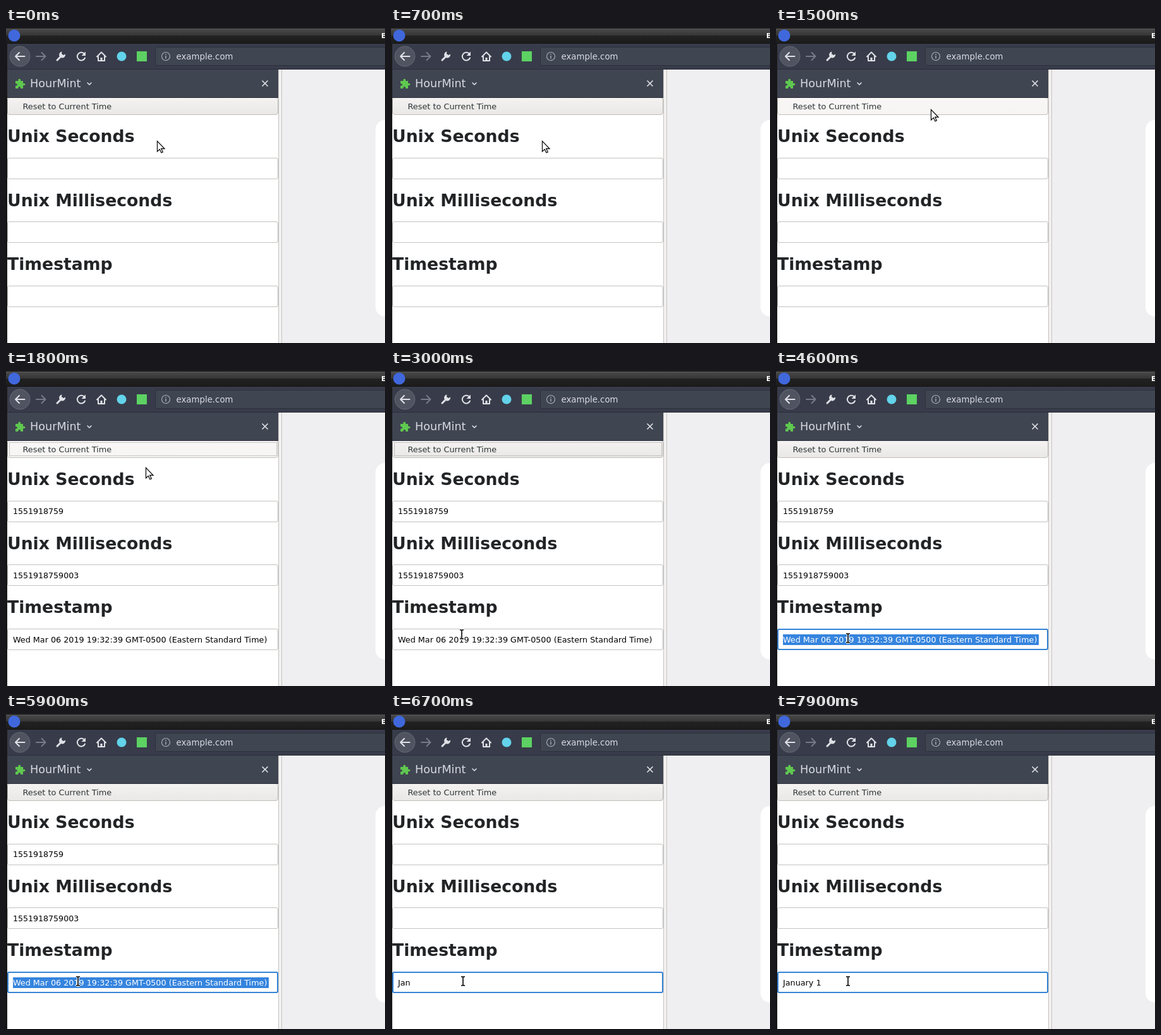
Recreate the animation shown at these times as an HTML page. Size 600x500 px, loop 8 s.

```html
<!DOCTYPE html>
<html lang="en">
<head>
<meta charset="utf-8">
<title>Time sidebar</title>
<style>
  html, body { margin: 0; width: 100%; height: 100%; overflow: hidden; background: #fff; }
  svg { display: block; width: 600px; height: 500px; }
  text { font-family: "DejaVu Sans", sans-serif; white-space: pre; }
  .head { font-size: 26.67px; font-weight: bold; fill: #222426; }
  .value { font-size: 12.75px; fill: #000; }
  .number { font-size: 12.6px; }
  .field { fill: #fff; stroke: #c2c2c0; }
  .icon { fill: none; stroke: #dfe1e6; stroke-width: 2; stroke-linecap: round; stroke-linejoin: round; }
</style>
</head>
<body>
<svg viewBox="0 0 600 500">
  <defs>
    <linearGradient id="bar" x2="0" y2="1">
      <stop offset="0" stop-color="#4c4c4c"/>
      <stop offset=".46" stop-color="#363636"/>
      <stop offset=".47" stop-color="#222"/>
      <stop offset="1" stop-color="#1b1b1b"/>
    </linearGradient>
    <linearGradient id="plain" x2="0" y2="1">
      <stop offset="0" stop-color="#f4f3f2"/>
      <stop offset="1" stop-color="#e9e8e6"/>
    </linearGradient>
    <linearGradient id="lit" x2="0" y2="1">
      <stop offset="0" stop-color="#f8f7f6"/>
      <stop offset="1" stop-color="#f6f5f3"/>
    </linearGradient>
  </defs>

  <!-- window frame and toolbar -->
  <rect width="600" height="500" fill="#fff"/>
  <rect width="600" height="25" fill="url(#bar)"/>
  <rect width="600" height="1" fill="#171717"/>
  <rect y="1" width="600" height="1" fill="#5a5a5a"/>
  <circle cx="13" cy="12" r="9.5" fill="#4068dc"/>
  <text x="594" y="16" font-size="11" font-weight="bold" fill="#fff">E</text>
  <rect y="25" width="600" height="41" fill="#383c4a"/>
  <rect y="24" width="600" height="1" fill="#15161a"/>

  <circle cx="22" cy="45" r="16" fill="#505461" stroke="#656975"/>
  <path class="icon" d="M29.5 45H15M21 39l-6 6 6 6"/>
  <path class="icon" d="M48 45H62M56.500 39l6 6-6 6" style="stroke:#777b87"/>
  <path class="icon" d="M81 51L88.500 43.500" style="stroke-width:3"/>
  <path d="M94 41.500a5 5 0 1 1-5.500-4l-.5 3.500 3 2z" fill="#dfe1e6"/>
  <path class="icon" d="M125 47.500A6.300 6.300 0 1 1 123.500 40.500"/>
  <path d="M126 37.500v6.500h-6.500z" fill="#dfe1e6"/>
  <path class="icon" d="M144 45.500L151 38.500l7 7M146 45v7h10v-7"/>
  <rect x="149.500" y="47" width="3" height="5" fill="#dfe1e6"/>
  <circle cx="183" cy="45" r="7.500" fill="#62d3ea"/>
  <rect x="207" y="37" width="16" height="16" fill="#5dd162"/>
  <rect x="236.500" y="30.500" width="370" height="29" rx="3" fill="#404552" stroke="#2d303c"/>
  <circle cx="253" cy="45" r="6.500" fill="none" stroke="#a8abb4" stroke-width="1.200"/>
  <path d="M253 44v4.500M253 41v1.500" stroke="#a8abb4" stroke-width="1.500"/>
  <text x="269.500" y="50" font-size="13.33" fill="#d8dbe2">example.com</text>

  <!-- sidebar -->
  <rect y="66" width="431" height="44" fill="#404552"/>
  <rect y="65" width="600" height="1" fill="#2b2e39"/>
  <rect y="110" width="431" height="1" fill="#2b2e39"/>
  <path d="M15 84h4.500c-1.500-4.500 5-4.500 3.500 0h4v4c4.500-1.500 4.500 4.500 0 3v5h-4c1-4-4.500-4-3.500 0H15v-4.500c4 1 4-4 0-3z" fill="#5fc84f"/>
  <text x="38" y="94" font-size="17.6" fill="#d6d9e0">HourMint</text>
  <path class="icon" d="M129 87l3 3 3-3" style="stroke-width:1.600"/>
  <path class="icon" d="M406 84l8 8M414 84l-8 8" style="stroke-width:1.700"/>

  <rect id="button" x="2.500" y="110.500" width="428" height="27" rx="3.500" stroke="#c0bdb9"/>
  <rect y="110" width="431" height="1" fill="#2b2e39"/>
  <rect id="ring" x="5.500" y="113.500" width="423" height="21" fill="none" stroke="#969492" stroke-dasharray="1 1"/>
  <text x="26.500" y="129" font-size="12.85" fill="#2e3436">Reset to Current Time</text>

  <text class="head" x="2" y="181">Unix Seconds</text>
  <rect class="field" x="2.500" y="206.500" width="428" height="33" rx="2.500"/>
  <text class="value number" id="seconds" x="11" y="227"></text>
  <text class="head" x="2" y="283">Unix Milliseconds</text>
  <rect class="field" x="2.500" y="307.500" width="428" height="33" rx="2.500"/>
  <text class="value number" id="millis" x="11" y="329"></text>
  <text class="head" x="2" y="384">Timestamp</text>
  <rect class="field" x="2.500" y="409.500" width="428" height="33" rx="2.500"/>
  <rect id="focus" x="3" y="410" width="427" height="32" rx="2" fill="#fff" stroke="#3583d5" stroke-width="2"/>
  <rect id="mark" x="11" y="418" width="405" height="17" fill="#3584de"/>
  <text class="value" id="stamp" x="11" y="431"></text>

  <!-- splitter and page -->
  <rect x="431" y="66" width="6" height="434" fill="#f2f1f0"/>
  <path d="M431.500 66V500M436.500 66V500" stroke="#c6c4c1"/>
  <rect x="437" y="66" width="163" height="434" fill="#efeff1"/>
  <rect x="585" y="146" width="60" height="312" rx="15" fill="#fff"/>
  <rect y="25" width="2" height="475" fill="#191919"/>

  <path id="arrow" d="M.5.500V17L4.300 13.500 6.900 19 9.300 17.900 6.800 12.500H12Z" fill="#fff" stroke="#111" stroke-width="1.300"/>
  <g id="beam" fill="none">
    <path d="M-3-7H-1L0-6 1-7H3M0-6V6M-3 7H-1L0 6 1 7H3" stroke="#fff" stroke-width="3.500"/>
    <path d="M-3-7H-1L0-6 1-7H3M0-6V6M-3 7H-1L0 6 1 7H3" stroke="#000" stroke-width="1.600"/>
  </g>
</svg>
<script>
const LOOP = 8000, STEP = 100;
const FILL = 1800, FOCUS = 3500, SELECT = 3700;
const DATE = "Wed Mar 06 2019 19:32:39 GMT-0500 (Eastern Standard Time)";
const TYPED = "January 1";
const KEYS = [6300, 6500, 6700, 6900, 7000, 7200, 7400, 7600, 7700];

// Pointer stops: time, x, y
const PATH = [
  [0, 239, 179], [800, 239, 179], [1400, 245, 129], [1600, 245, 129],
  [1700, 238, 134], [1800, 221, 153], [3000, 112, 418],
  [3200, 112, 418], [3400, 114, 424], [LOOP, 114, 424]
];

const $ = id => document.getElementById(id);
const show = (id, on) => $(id).setAttribute("visibility", on ? "visible" : "hidden");
const ease = u => u * u * (3 - 2 * u);

function pointer(t) {
  const i = PATH.findIndex(p => p[0] > t);
  const [t0, x0, y0] = PATH[i - 1], [t1, x1, y1] = PATH[i];
  const u = ease((t - t0) / (t1 - t0));
  return [x0 + (x1 - x0) * u, y0 + (y1 - y0) * u];
}

function draw(t) {
  const [x, y] = pointer(t);
  const inField = [206, 307, 409].some(top => y >= top && y < top + 34);
  const typed = KEYS.filter(k => k <= t).length;
  const filled = t >= FILL && !typed;
  const selected = t >= SELECT && !typed;

  for (const id of ["arrow", "beam"])
    $(id).setAttribute("transform", `translate(${Math.round(x)} ${Math.round(y)})`);
  show("arrow", !inField);
  show("beam", inField);

  const hover = y < 138 || t === FILL;
  $("button").setAttribute("fill", `url(#${hover ? "lit" : "plain"})`);
  show("ring", t >= 1700 && t < FOCUS);
  show("focus", t >= FOCUS);
  show("mark", selected);

  $("seconds").textContent = filled ? "1551918759" : "";
  $("millis").textContent = filled ? "1551918759003" : "";
  $("stamp").textContent = filled ? DATE : TYPED.slice(0, typed);
  $("stamp").style.fill = selected ? "#fff" : "#000";
}

const start = performance.now();
function tick() {
  const t = (performance.now() - start) % LOOP;
  draw(Math.floor(t / STEP) * STEP);
  requestAnimationFrame(tick);
}
tick();
</script>
</body>
</html>
```
